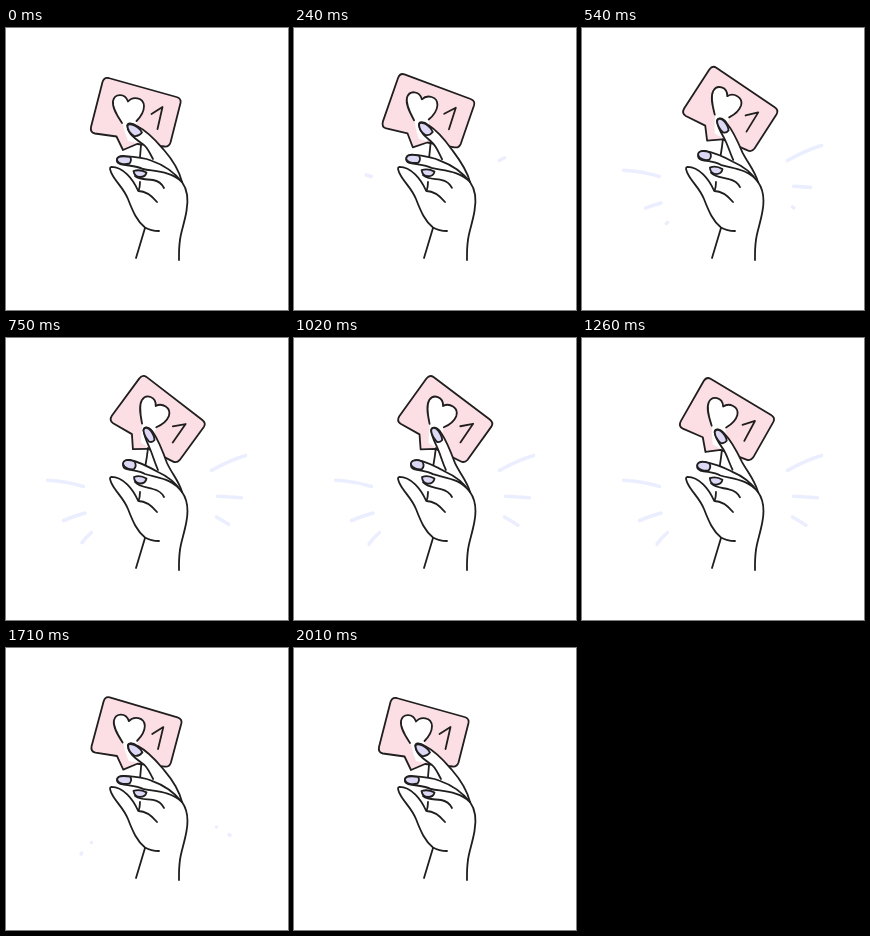
Write an HTML page that moves like this. It is 282 by 282 pixels and loops after 2.55 s.

```html
<!DOCTYPE html>
<html lang="en">
<head>
<meta charset="utf-8">
<title>Like in hand</title>
<style>
  html, body { margin: 0; width: 100%; height: 100%; overflow: hidden; background: #fff; }
  svg { display: block; width: 100vw; height: 100vh; }
  .ink { fill: none; stroke: #201e1f; stroke-width: 1.8; stroke-linecap: round; stroke-linejoin: round; }
  .skin { fill: #fff; }
  .pink { fill: #fcdfe5; }
  .nail { fill: #dcd8f6; }
  #rays { fill: none; stroke: #ebeefe; stroke-width: 3.6; stroke-linecap: round; }
</style>
</head>
<body>
<svg viewBox="0 0 282 282">
  <g id="rays">
    <path pathLength="1" d="M77.500 148.500Q60 143 41.500 142.200"/>
    <path pathLength="1" d="M205.500 132.500Q222 123 239.500 117.500"/>
    <path pathLength="1" d="M79 175Q68 178 57.500 182.500"/>
    <path pathLength="1" d="M211.500 158.200L235.500 159.800"/>
    <path pathLength="1" d="M85.500 194.500Q79 200 75 206"/>
    <path pathLength="1" d="M210.500 179L224 187.200"/>
  </g>
  <g id="bubble">
    <path class="ink pink" d="M102.500 50L170.500 69Q175.500 70.500 174.500 75L164.500 114.500Q163 119 158.500 118.500L131 116L117 122L110.500 108.500L89 105.500Q84 104.500 85 99L96.500 54Q98 49 102.500 50Z"/>
    <path class="skin" d="M116.500 95L122 84L131 93L131 115L122 113L118.500 103Z"/>
    <path class="ink skin" d="M116 95C111.500 88 106 80 107 73C108.500 65.500 119 64.500 122 73.500C126.500 68 137.500 69 138 78C138 84 134.500 89 130.500 93"/>
    <path class="ink" d="M145.500 86L156.500 79L151.500 101"/>
  </g>
  <g id="fingers"></g>
  <g class="ink">
    <path d="M134 154Q134 159 132.500 163C140 163 146 168 151 174"/>
    <path d="M132 162.500C127 151 117 138.800 105.500 138.800C103 139 104 143 107 148C111 155 118 161 122 171C127 184 131 193 139 199.500Q145 203 153 203"/>
    <path d="M139 200L130 230"/>
    <path d="M176 154C181 161 182.500 172 180.500 183C178.500 195 174.800 204 174 212Q172.800 220 173 232"/>
  </g>
</svg>
<script>
const LOOP = 2550, SWING = 22;

// Each part: class, resting path, raised path
const parts = [
  ["ink", "M135 117Q134.500 123 134 129", "M142 110Q141 119 139.500 127"],
  ["ink", "M129 148C134 152 140 151 147 152C153 153 156 156 158 160",
          "M129 144C133 149 140 149 147 151C153 152.500 156 155 158 159"],
  ["ink nail", "M127.500 143Q134 141 140.500 144.500C140 147 138 149 134 149C130 149 128 146 127.500 143Z",
               "M128 139Q134 136.500 140.500 140.500C140 143.500 138 145.500 134 145.500C130 145.500 128 142 128 139Z"],
  ["ink skin", "M176 154C173 142 165 130 158 122C151 114 143 104 131 98C125 94 120 95 121.500 99C122 106 130 111 136 115.500C141 118 143 124 147 131",
               "M176 154C173 143 166 136 161 125C157 114 153 103 147.500 95C144 88.500 138 88 137.500 92C138 98 141 104 143 108.500C146.500 116 148 123 152 132"],
  ["ink nail", "M121.500 97.500C123 95 128 97 131 99C134 101 135.500 103 136 104.500C134 107 131 108.500 128 108C124 105.500 121.500 102 121.500 97.500Z",
               "M137.500 92.500C138 88.500 142 89 145 93C147 96 148.500 99 148.500 102C147 104 145 104.500 143 103.500C140 100 138 97 137.500 92.500Z"],
  ["ink skin", "M176 154C168 144 158 137 145 132.500C137 129 125 128.500 117 128C110 128 109 134 114 136C123 138 130 137.500 137 141C148 143.500 165 143 176 154",
               "M176 154C170 145 161 138 152 134C144 129.500 134 124 124 122C117 121 115 129 120 131C128 133 133 132.500 139 136C151 140 166 140 176 154"],
  ["ink nail", "M124 128.800C117 127.800 110.500 128 111 132C112 136.500 119 136.500 123.500 135.500C125.500 133 125.500 131 124 128.800Z",
               "M128.500 123.500C124 121.500 117 121 117 126C118 130.500 125 132 128 131C130 129 130 126 128.500 123.500Z"]
];

const $ = id => document.getElementById(id);
const rays = [...$("rays").children];
const fingers = parts.map(([cls, rest, raised]) => {
  const el = document.createElementNS("http://www.w3.org/2000/svg", "path");
  el.setAttribute("class", cls);
  $("fingers").append(el);
  return { el, rest, goal: raised.match(/[\d.]+/g) };
});

const ease = (t, from, to) => {
  const k = Math.min(1, Math.max(0, (t - from) / (to - from)));
  return (1 - Math.cos(Math.PI * k)) / 2;
};

const blend = (rest, goal, k) => {
  let i = 0;
  return rest.replace(/[\d.]+/g, n => (+n + (goal[i++] - n) * k).toFixed(2));
};

function draw(t) {
  const lift = ease(t, 25, 720) - ease(t, 935, 1815);
  $("bubble").setAttribute("transform", `rotate(${SWING * lift} 150 142)`);
  for (const { el, rest, goal } of fingers) el.setAttribute("d", blend(rest, goal, lift));

  // Rays grow outwards pair by pair, then leave the same way
  rays.forEach((ray, i) => {
    const pair = i >> 1, show = 150 + 160 * pair, hide = 1245 + 122 * pair;
    const head = ease(t, show, show + 360), tail = ease(t, hide, hide + 265);
    ray.style.visibility = head - tail > 0.005 ? "visible" : "hidden";
    ray.setAttribute("stroke-dasharray", `0 ${tail} ${head - tail} 2`);
  });
}

const start = performance.now();
function tick() {
  draw((performance.now() - start) % LOOP);
  requestAnimationFrame(tick);
}
tick();
</script>
</body>
</html>
```
